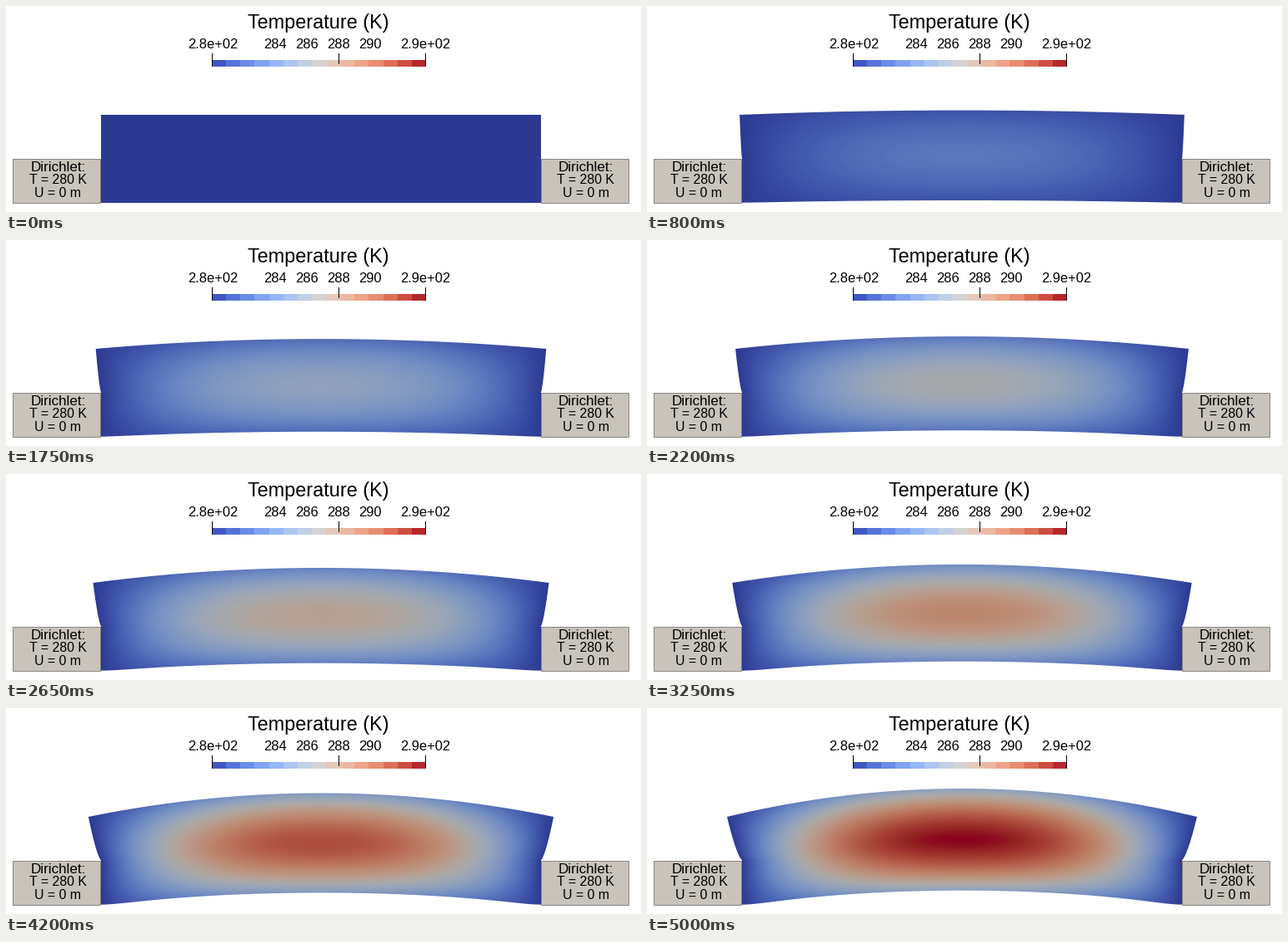
Recreate the animation shown at these times as a matplotlib script. Size 762x248 px, loop 5.05 s.

```python
import numpy as np
import matplotlib.pyplot as plt
from matplotlib.animation import FuncAnimation
from matplotlib.patches import Rectangle
from matplotlib.path import Path

W, H, DPI = 762, 248, 100
FRAMES, STEP = 101, 50
CX, HALF = 378, 264            # beam centre and half length
TOP, BOTTOM, CLAMP = 131, 236.7, 183
Y0, Y1 = 90, 240               # rows that hold the heated beam

plt.rcParams["font.family"] = "Liberation Sans"
fig = plt.figure(figsize=(W / DPI, H / DPI), dpi=DPI, facecolor="white")
ax = fig.add_axes([0, 0, 1, 1])
ax.axis("off")

cmap = plt.get_cmap("coolwarm")
lit = np.round(cmap(np.linspace(0, 1, 256))[:, :3] * 255 * 0.76).astype(np.uint8)
xs = np.arange(W) + 0.5
ys = np.arange(Y0, Y1) + 0.5


def half_width(y, s):
    free = np.clip((CLAMP - y) / (CLAMP - TOP), 0, 1)
    return HALF + 18 * s * free ** 0.7


def top_edge(x, s):
    u = (x - CX) / (HALF + 18 * s)
    return TOP - 34 * s * (1 - u ** 2)


def bottom_edge(x, s):
    u = np.clip(np.abs(x - CX) / HALF, 0, 1)
    soft = 1 - np.exp(-(1 - u) * HALF / 25)
    return BOTTOM - 17 * s * (1 - u ** 2) * soft


def outline(s):
    y = np.linspace(BOTTOM, TOP, 90)
    w = half_width(y, s)
    x = np.linspace(-1, 1, 120)
    xt, xb = CX + x * (HALF + 18 * s), CX - x * HALF
    pts = np.concatenate([
        np.column_stack([CX - w, y]),
        np.column_stack([xt, top_edge(xt, s)]),
        np.column_stack([CX + w, y])[::-1],
        np.column_stack([xb, bottom_edge(xb, s)]),
    ])
    return Path(pts)


def heat(s):
    peak = (1 - np.exp(-0.4 * s)) / (1 - np.exp(-0.4))
    top, bottom = top_edge(xs, s), bottom_edge(xs, s)
    u = np.abs(xs[None, :] - CX) / half_width(ys, s)[:, None]
    v = np.abs(2 * (ys[:, None] - top) / (bottom - top) - 1)
    along = 1 - np.minimum(u, 1) ** 2.3
    across = 1 - 0.62 * np.minimum(v, 1) ** 1.8
    return lit[np.round(255 * peak * along * across).astype(int)]


def label(x, y, text, px):
    ax.text(x, y, text, fontsize=px * 72 / DPI, ha="center", va="baseline", color="black")


# Colour legend
label(375, 27.5, "Temperature (K)", 23.5)
for x, text in [(248, "2.8e+02"), (323, "284"), (361, "286"),
                (399, "288"), (437, "290"), (503, "2.9e+02")]:
    label(x, 51, text, 16.5)
bands = cmap((np.arange(15) + 0.5) / 15)[None]
bands[..., :3] *= 0.96
ax.imshow(bands, extent=(247, 504, 73, 65), interpolation="nearest", aspect="auto")
for x, end in [(247, 73), (399, 70), (503, 73)]:
    ax.add_patch(Rectangle((x, 57), 1, end - 57, fc="black", lw=0))

# Fixed supports
for x in (8, 641.6):
    ax.add_patch(Rectangle((x, 184), 105, 52.9, fc="#c8c4bc", ec="#77736e", lw=0.6))
    for y, text in [(199, "Dirichlet:"), (214.5, "T = 280 K"), (229.5, "U = 0 m")]:
        label(x + 54.3, y, text, 17 if y == 199 else 15.9)

beam = ax.imshow(heat(0), extent=(0, W, Y1, Y0), interpolation="nearest",
                 aspect="auto", zorder=3)
ax.set_xlim(0, W)
ax.set_ylim(H, 0)


def update(i):
    s = i / (FRAMES - 1)
    beam.set_data(heat(s))
    beam.set_clip_path(outline(s), ax.transData)
    return [beam]


anim = FuncAnimation(fig, update, frames=FRAMES, interval=STEP, repeat=True,
                     repeat_delay=0, init_func=lambda: update(0))
plt.show()
```
